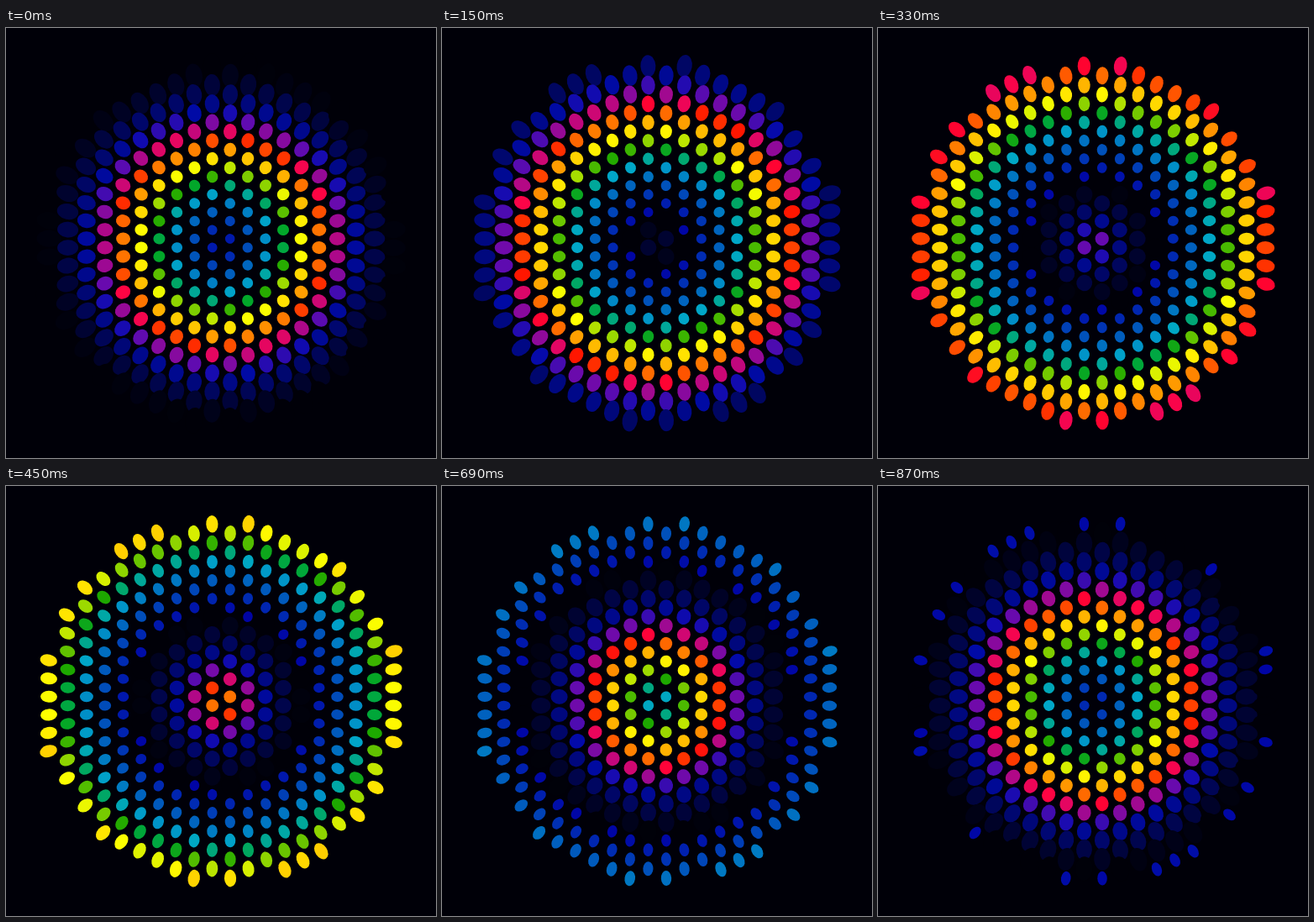
Write an HTML page with a canvas that moves like this. It is 512 px wide and 512 px high and loops after 900 ms.

```html
<!DOCTYPE html>
<html lang="en">
<head>
<meta charset="utf-8">
<title>Rainbow dot ripple</title>
<style>
  html, body { margin: 0; width: 100%; height: 100%; overflow: hidden; background: #000008; }
  canvas { display: block; width: 512px; height: 512px; }
</style>
</head>
<body>
<canvas id="stage" width="512" height="512"></canvas>
<script>
const ctx = document.getElementById('stage').getContext('2d');
const LOOP = 900, STEP = 30;
const CENTER = 256.2, GAP = 21, RADIUS = 209;
const WAVE = 210;    // distance between two waves, covered once per loop
const CREST = 95;    // radius of the yellow ring at the start of the loop
const TAIL = -95.5;  // trailing end of the wave, where it restarts as black

// 0 at "from", 1 at "to", clamped outside and bent by a power
const ramp = (d, from, to, power = 1) =>
  Math.min(1, Math.max(0, (d - from) / (to - from))) ** power;

// Colour by distance ahead of the yellow ring: blue tail, spectrum, fading blue front
function colorAt(d) {
  const red = 255 * ramp(d, -20, 0) * ramp(d, 60, 34);
  const tail = (165 + 35 * ramp(d, -95, -40)) * ramp(d, -18, -35, 0.7);
  const front = 176 * ramp(d, 32, 50, 0.45) * ramp(d, 112, 58, 1.3);
  const green = (167 * ramp(d, -100, -35, 1.4) + 88 * ramp(d, -18, 0)) * ramp(d, 33, 0, 0.75);
  const blue = Math.max(tail, front, d > 60 ? 8 : 0);
  return `rgb(${[red, green + 0.06 * front, blue].map(Math.round)})`;
}

// Staggered grid inside a circle, bulging slightly toward the rim
const dots = [];
for (let col = -10; col < 10; col++) {
  for (let row = -10; row <= 10; row++) {
    const x = (col + 0.5) * GAP;
    const y = (row + (col % 2 ? 0.25 : -0.25)) * GAP;
    const r = Math.hypot(x, y);
    if (r > RADIUS) continue;
    const rim = (r / 205) ** 2;
    const bulge = 1 + 0.03 * rim;
    dots.push({
      x: CENTER + x * bulge,
      y: CENTER + y * bulge,
      r,
      angle: Math.atan2(y, x),
      stretch: 1 + 0.45 * rim
    });
  }
}

function draw(time) {
  ctx.fillStyle = '#000008';
  ctx.fillRect(0, 0, 512, 512);
  const crest = CREST + WAVE * time / LOOP;
  for (const { x, y, r, angle, stretch } of dots) {
    const lag = r - crest - TAIL;
    const d = lag - Math.floor(lag / WAVE) * WAVE + TAIL;
    const size = 4.7 + 2.3 * Math.exp(d / 120);
    ctx.fillStyle = colorAt(d);
    ctx.beginPath();
    ctx.ellipse(x, y, size * stretch, size, angle, 0, Math.PI * 2);
    ctx.fill();
  }
}

function tick() {
  const t = performance.now() % LOOP;
  draw(Math.floor(t / STEP) * STEP);
  requestAnimationFrame(tick);
}
tick();
</script>
</body>
</html>
```
